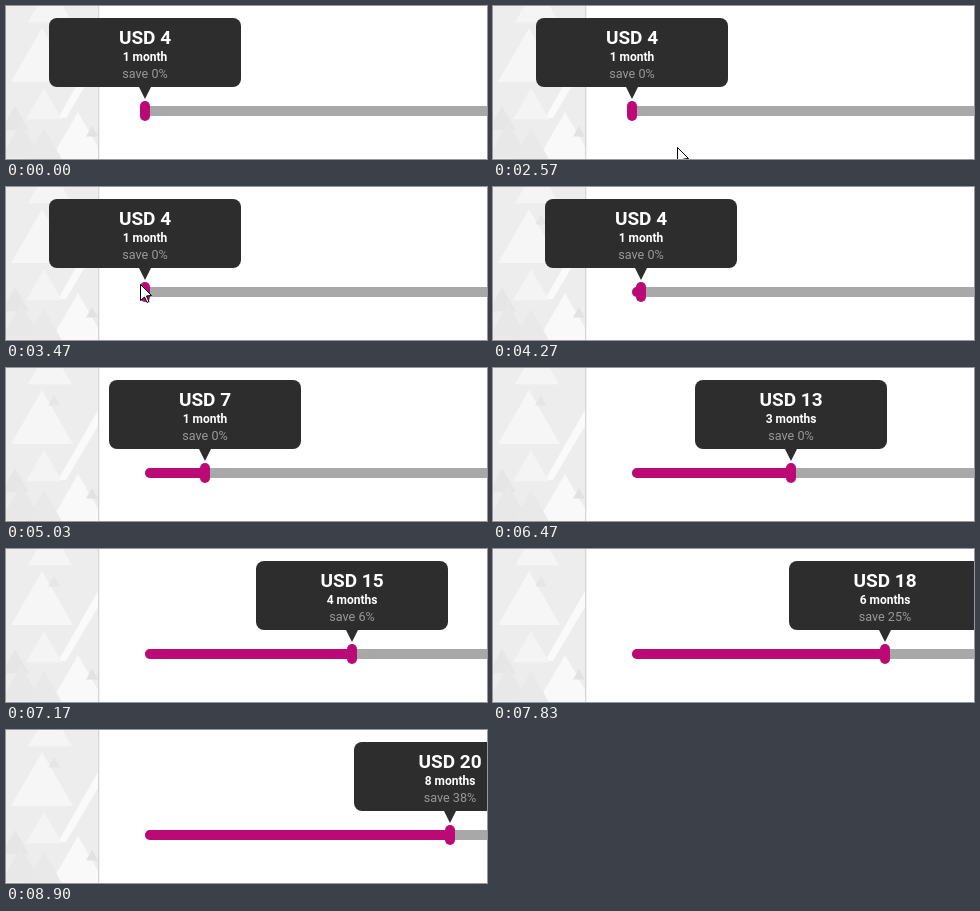
Animation of 481x153 px, one loop 9660 ms. Source, as an HTML page with a canvas:

```html
<!DOCTYPE html>
<html lang="en">
<head>
<meta charset="utf-8">
<title>Price slider</title>
<style>
html, body { margin: 0; width: 100%; height: 100%; overflow: hidden; background: #fff; }
canvas { display: block; }
</style>
</head>
<body>
<canvas id="stage" width="481" height="153"></canvas>
<script>
const ctx = document.getElementById('stage').getContext('2d');
const LOOP = 9660, START = 139, MONTHLY = 4;
const PINK = '#bb0a76', DARK = '#2d2d2d', GREY = '#a8a8a8';

const clamp = v => Math.min(1, Math.max(0, v));
const mix = (a, b, p) => a + (b - a) * p;
const phase = (t, from, to) => clamp((t - from) / (to - from));

// A nudge, one long steady drag, a pause, then a slower last stretch
function handleX(t) {
  return Math.round(START
    + 2 * phase(t, 3640, 3760)
    + 7 * phase(t, 4170, 4270)
    + 101 * phase(t, 4270, 5770)
    + 168 * phase(t, 5770, 8190)
    + 27 * phase(t, 8340, 8900));
}

// Eases in to the handle, then slips off the bottom edge
function mouseAt(t) {
  const come = 1 - (1 - phase(t, 2570, 3530)) ** 2;
  const go = phase(t, 3560, 4030) ** 1.5;
  return [mix(184, 134, come) + 4 * go, mix(141, 97, come) + 57 * go];
}

function offer(x) {
  const price = Math.round(4 + (x - START) * 0.0535);
  const bonus = Math.max(0, Math.floor((price - 12) * 0.375));
  const months = Math.floor(price / MONTHLY) + bonus;
  const save = Math.max(0, Math.round(100 * (1 - price / (MONTHLY * months))));
  return { price, months, save };
}

function poly(points, color) {
  ctx.beginPath();
  points.forEach(([x, y]) => ctx.lineTo(x, y));
  ctx.closePath();
  ctx.fillStyle = color;
  ctx.fill();
}

// Near-equilateral triangle, apex up
function peak(x, y, half, color) {
  const base = y + half * 1.74;
  poly([[x, y], [x + half, base], [x - half, base]], color);
}

function pill(x, y, w, h, r, color) {
  ctx.beginPath();
  ctx.roundRect(x, y, w, h, r);
  ctx.fillStyle = color;
  ctx.fill();
}

function label(text, x, y, font, color) {
  ctx.font = font + ' Roboto, sans-serif';
  ctx.textAlign = 'center';
  ctx.fillStyle = color;
  ctx.fillText(text, x, y);
}

function sidebar() {
  ctx.save();
  ctx.beginPath();
  ctx.rect(0, 0, 92, 153);
  ctx.clip();
  ctx.fillStyle = '#ededed';
  ctx.fillRect(0, 0, 92, 153);
  poly([[92, 42], [92, 58], [60, 112], [52, 112]], '#fafafa');
  peak(44, -22, 22, '#f5f5f5');
  peak(36, 22, 31, '#f6f6f6');
  peak(48, 27, 6, '#e6e6e6');
  peak(38, 82, 18, '#f4f4f4');
  peak(72, 106, 27, '#f9f9f9');
  peak(9, 100, 14, '#e6e6e6');
  peak(15, 117, 20, '#e8e8e8');
  peak(38, 122, 18, '#e9e9e9');
  peak(86, 120, 6, '#e2e2e2');
  ctx.restore();
  ['#d6d6d6', '#f2f2f2'].forEach((color, i) => {
    ctx.fillStyle = color;
    ctx.fillRect(92 + i, 0, 1, 153);
  });
}

function slider(x) {
  pill(START, 100, 400, 10, 5, GREY);
  if (x > START) pill(START, 100, Math.max(10, x - START), 10, [5, 0, 0, 5], PINK);
  pill(x - 5, 95, 10, 20, 5, PINK);
}

function tooltip(x) {
  const { price, months, save } = offer(x);
  pill(x - 96, 12, 192, 69, 8, DARK);
  poly([[x - 6, 81], [x + 6, 81], [x, 93]], DARK);
  label('USD ' + price, x, 38, 'bold 19px', '#fff');
  label(months + (months > 1 ? ' months' : ' month'), x, 55, 'bold 12px', '#fff');
  label('save ' + save + '%', x, 72, '12.6px', '#999');
}

function pointer(x, y) {
  ctx.save();
  ctx.translate(Math.round(x) + 0.5, Math.round(y) + 0.5);
  poly([[0, 0], [0, 16], [4, 12.5], [6.5, 18], [8.5, 17], [6, 11.5], [11, 11]], '#fff');
  ctx.strokeStyle = '#000';
  ctx.lineWidth = 1;
  ctx.stroke();
  ctx.restore();
}

function draw(t) {
  ctx.fillStyle = '#fff';
  ctx.fillRect(0, 0, 481, 153);
  sidebar();
  const x = handleX(t);
  slider(x);
  tooltip(x);
  if (t >= 2570 && t < 4030) pointer(...mouseAt(t));
}

const begin = performance.now();
function frame() {
  draw((performance.now() - begin) % LOOP);
  requestAnimationFrame(frame);
}
frame();
</script>
</body>
</html>
```
